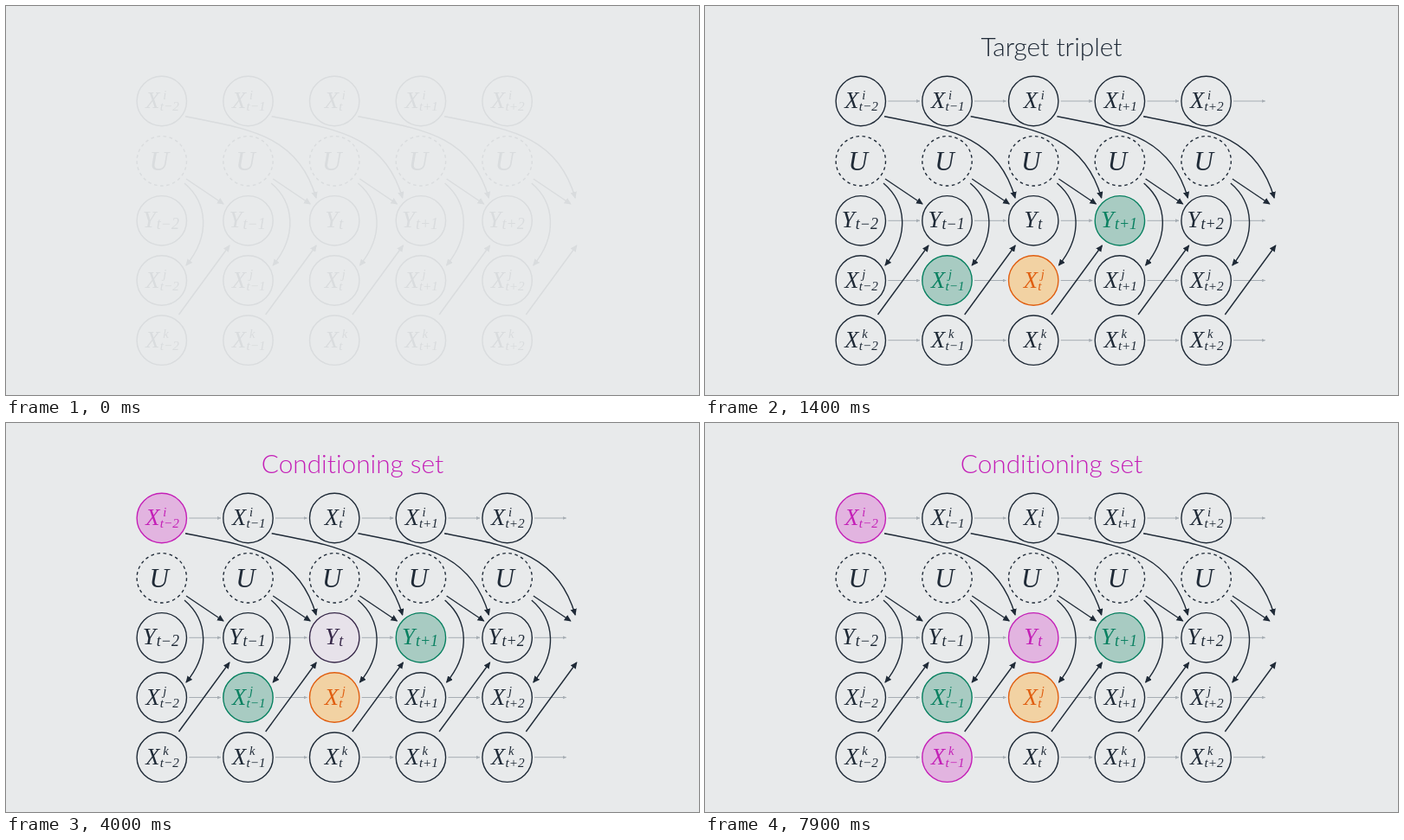
An HTML page that plays this animation: 800 by 450 pixels, repeating every 8 s.

```html
<!DOCTYPE html>
<html lang="en">
<head>
<meta charset="utf-8">
<title>Conditioning set</title>
<style>
html, body { margin: 0; width: 100%; height: 100%; overflow: hidden; background: #e8eaeb; }
svg { display: block; width: 800px; height: 450px; }
.title { font: 300 29.8px Lato, "Open Sans", sans-serif; font-variant-ligatures: none; text-anchor: middle; }
.math { font-family: "Liberation Serif", "Times New Roman", serif; font-style: italic; }
</style>
</head>
<body>
<svg viewBox="0 0 800 450">
  <defs>
    <marker id="head" markerUnits="userSpaceOnUse" markerWidth="9" markerHeight="8" refX="7" refY="3.7" orient="auto">
      <path d="M0 0L8 3.7L0 7.4Z" fill="#1f2a37"/>
    </marker>
    <marker id="small" markerUnits="userSpaceOnUse" markerWidth="5" markerHeight="5" refX="4" refY="2" orient="auto">
      <path d="M0 0L4.5 2L0 4Z" fill="#a6adb3"/>
    </marker>
  </defs>
  <g id="graph"></g>
  <text id="target" class="title" x="400" y="57.5" fill="#1f2a37">Target triplet</text>
  <text id="conditioning" class="title" x="400" y="57.5" fill="#c41fb7">Conditioning set</text>
</svg>
<script>
const LOOP = 8000, STEP = 99.7, LINK_STEP = 100.2, LEFT = 179.8, RADIUS = 28.7;
const ROWS = [110, 179.3, 248.3, 317.5, 386.7];
const INK = [31, 42, 55];
const GREEN = { line: [8, 128, 96], fill: [168, 203, 194] };
const ORANGE = { line: [224, 94, 16], fill: [242, 210, 163] };
const PINK = { line: [196, 31, 183], fill: [226, 180, 224] };
const SUBS = ["t−2", "t−1", "t", "t+1", "t+2"];

const byId = id => document.getElementById(id);
const graph = byId("graph");

function add(parent, tag, attrs, text) {
  const el = document.createElementNS("http://www.w3.org/2000/svg", tag);
  for (const key in attrs) el.setAttribute(key, attrs[key]);
  if (text) el.textContent = text;
  parent.append(el);
  return el;
}

function arrow(d, shift) {
  add(graph, "path", {
    d, transform: `translate(${shift})`, fill: "none",
    stroke: "#1f2a37", "stroke-width": 1.4, "marker-end": "url(#head)"
  });
}

function node(row, col) {
  const g = add(graph, "g", { class: "math", transform: `translate(${LEFT + col * STEP} ${ROWS[row]})` });
  const disc = add(g, "circle", { r: RADIUS, "stroke-width": 1.4, fill: "none" });
  const label = add(g, "g", {});
  const write = (x, y, size, text) => add(label, "text", { x, y, "font-size": size }, text);
  const sub = SUBS[col], short = sub === "t";
  if (row === 1) {
    disc.setAttribute("stroke-dasharray", "3.6 3.6");
    write(-14.2, 10.3, 31, "U");
  } else if (row === 2) {
    const x = short ? -11 : -22;
    write(x, 7.7, 27, "Y");
    write(x + 16, 9.7, 18, sub);
  } else {
    const x = short ? -11.5 : -18.5;
    write(x, 8, 26.5, "X");
    write(x + 16.5, 11, 15.2, sub);
    write(x + 20, -2.3, 14.5, { 0: "i", 3: "j", 4: "k" }[row]);
  }
  const paint = (tone, k) => {
    const line = `rgb(${INK.map((v, i) => v + (tone.line[i] - v) * k)})`;
    disc.setAttribute("stroke", line);
    label.setAttribute("fill", line);
    disc.setAttribute("fill", `rgba(${tone.fill},${k})`);
  };
  paint(PINK, 0);
  return paint;
}

const links = add(graph, "g", { stroke: "#a6adb3", "stroke-width": 1 });
const nodes = ROWS.map((y, row) => SUBS.map((_, col) => {
  if (row !== 1) {
    const x = LEFT + col * STEP;
    add(links, "path", { d: `M${x + 31.5} ${y}H${x + 68}`, "marker-end": "url(#small)" });
  }
  return node(row, col);
}));

for (let col = 0; col < 5; col++) {
  const shift = col * LINK_STEP;
  if (col < 4) arrow("M207 127.7C278 142 337 148 358 222", col * STEP);
  arrow("M208 200L251 229", shift);
  arrow("M206 205C233 228 236 266 208 300", shift);
  arrow("M199.5 357L258 277", shift);
}

// Row, column, colours, start of the fade
const highlights = [
  [2, 3, GREEN, 500], [3, 1, GREEN, 500], [3, 2, ORANGE, 500],
  [0, 0, PINK, 3100], [2, 2, PINK, 3900], [4, 1, PINK, 4750]
];

const ramp = (t, from, length) => Math.min(1, Math.max(0, (t - from) / length));

function frame(now) {
  const t = now % LOOP;
  graph.setAttribute("opacity", ramp(t, -35, 500));
  links.setAttribute("opacity", ramp(t, 50, 450));
  for (const [row, col, tone, start] of highlights) nodes[row][col](tone, ramp(t, start, 700));
  byId("target").setAttribute("opacity", ramp(t, 700, 500) * (1 - ramp(t, 2580, 400)));
  byId("conditioning").setAttribute("opacity", ramp(t, 3100, 500));
  requestAnimationFrame(frame);
}
requestAnimationFrame(frame);
</script>
</body>
</html>
```
